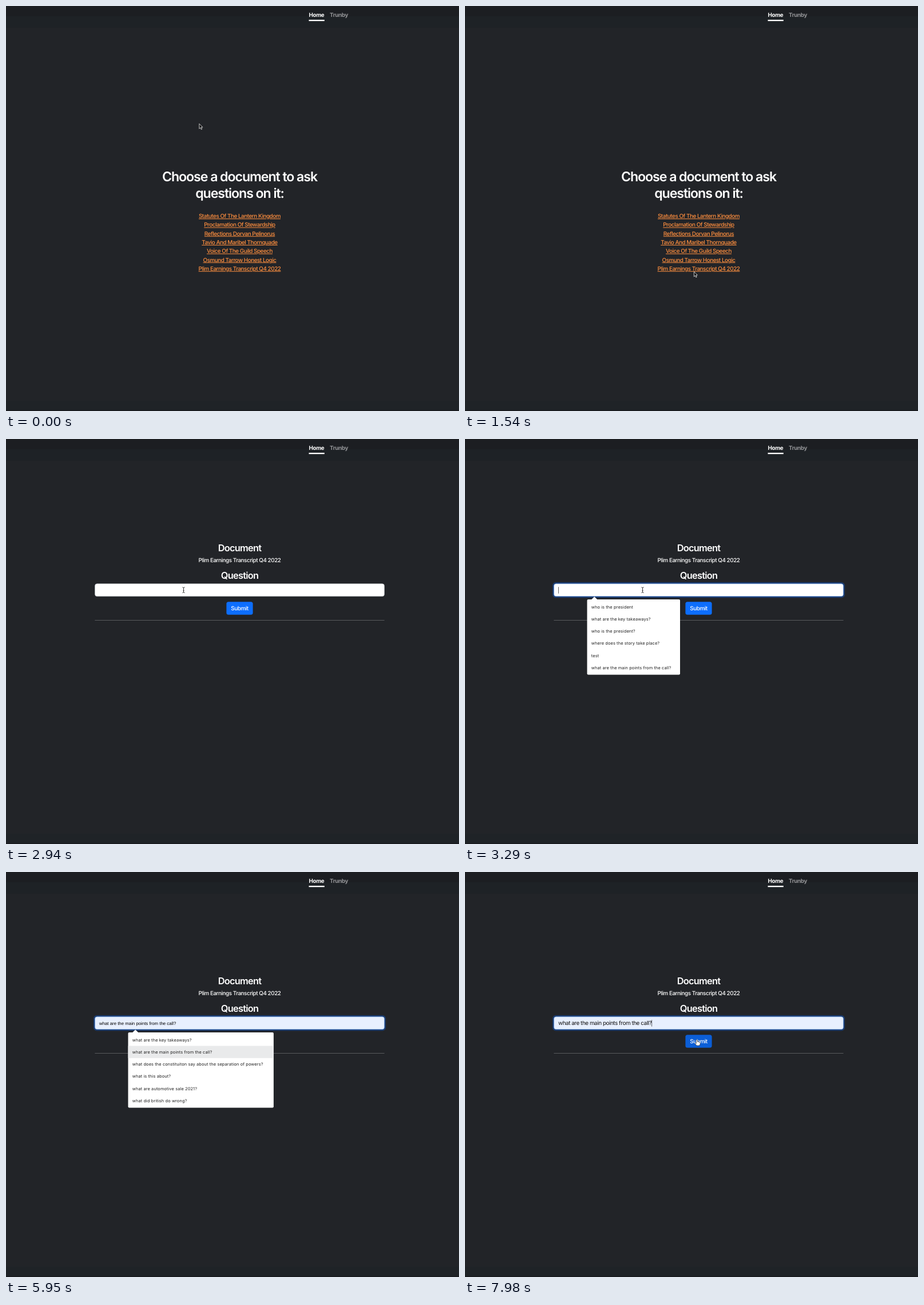
Recreate the animation shown at these times as an HTML page. Size 792 by 707 pixels, loop 8000 ms.

```html
<!DOCTYPE html>
<html lang="en">
<head>
<meta charset="utf-8">
<title>Ask a document</title>
<style>
  html, body { margin: 0; height: 100%; overflow: hidden; background: #222428; }
  svg { display: block; width: 792px; height: 707px; }
  text {
    font: 9.9px Inter, sans-serif;
    font-optical-sizing: none;
    letter-spacing: -.045em;
    text-rendering: geometricPrecision;
    fill: #fff;
    white-space: pre;
  }
  .mid text { text-anchor: middle; font-weight: 450; letter-spacing: -.047em; }
  .mid .h1 { font-size: 23.2px; font-weight: 600; }
  .mid .h2 { font-size: 16.4px; font-weight: 600; }
  .nav text { font-weight: 700; letter-spacing: -.04em; }
  #links text { fill: #ff8f3f; text-decoration: underline; }
  #field text { fill: #111; }
  #field .preview { font: 7.84px "Liberation Sans", Arial, sans-serif; letter-spacing: 0; fill: #000; }
  #menu text { font-size: 7.4px; letter-spacing: .016em; fill: #222; }
</style>
</head>
<body>
<svg viewBox="0 0 792 707">
  <rect width="792" height="707" fill="#222428"/>
  <rect width="792" height="38" fill="#1e2226"/>
  <rect width="792" height="18" fill="#1c1e22"/>
  <rect y="689" width="792" height="18" fill="#1f2327"/>
  <rect y="705" width="792" height="2" fill="#1a1c20"/>
  <g class="nav">
    <text x="529.5" y="18.5">Home</text>
    <text x="566" y="18.5" style="fill:#929396">Trunby</text>
    <rect x="529.5" y="24" width="27.3" height="2.3" fill="#fff"/>
  </g>

  <g id="home" class="mid">
    <text class="h1" x="408.5" y="306.2">Choose a document to ask</text>
    <text class="h1" x="408.5" y="334.7">questions on it:</text>
    <g id="links"></g>
  </g>

  <g id="form">
    <g class="mid">
      <text class="h2" x="408.5" y="196">Document</text>
      <text x="408.5" y="214.8">Plim Earnings Transcript Q4 2022</text>
      <text class="h2" x="408.5" y="243.8">Question</text>
      <rect id="button" x="385.4" y="284.2" width="46.2" height="22.6" rx="3.6"/>
      <text x="408.5" y="299.1">Submit</text>
    </g>
    <rect x="155.3" y="316" width="506.3" height=".8" fill="#66686b"/>
    <g id="field">
      <rect id="ring" x="152.9" y="250.1" width="511.2" height="27.2" rx="6" fill="#0d6efd"/>
      <rect id="box" x="155.6" y="252.8" width="505.8" height="21.8" rx="3.6" stroke-width=".7"/>
      <text id="entry" x="163" y="267.2"></text>
      <rect id="caret" y="258.3" width=".7" height="11.4" fill="#222"/>
    </g>
    <g id="menu">
      <path d="M220.8 280.5l5.4-5.3 5.4 5.3z" fill="#fff"/>
      <rect id="panel" x="213.5" y="280" height="131.5" rx="2" fill="#fff"/>
      <rect id="mark" x="213.5" width="254.4" height="21.3" fill="#e9eaeb"/>
    </g>
  </g>

  <g id="cursor">
    <path id="arrow" d="M.4 .5V9.3L2.3 7.4 3.8 10.5 5.2 9.9 3.8 6.7H6.4Z" fill="#111" stroke="#fff" stroke-width=".75"/>
    <path id="beam" d="M-2-4.7Q0-4.7 0-3.5Q0-4.7 2-4.7M0-3.5V3.5M-2 4.7Q0 4.7 0 3.5Q0 4.7 2 4.7M-1 .8H1" fill="none" stroke="#222" stroke-width=".9"/>
    <path id="hand" d="M-1 .2Q0-.8 1 .2V3.6Q2 0 2.6 3.8 3.8 3.2 4.2 4.4 5.6 4 5.6 5.4V7.4L4.4 10H-.6L-3 6.6Q-3.6 5.2-2.2 5.4L-1 6.4Z" fill="#fff" stroke="#222" stroke-width=".6"/>
  </g>
</svg>
<script>
const $ = id => document.getElementById(id);
const show = (id, on) => $(id).style.display = on ? '' : 'none';
const set = (id, name, value) => $(id).setAttribute(name, value);

function addText(parent, x, y, str = '') {
  const el = document.createElementNS('http://www.w3.org/2000/svg', 'text');
  el.setAttribute('x', x);
  el.setAttribute('y', y);
  el.textContent = str;
  return $(parent).appendChild(el);
}

const FIRST = 366.7, PITCH = 15.28, ROW = 21.2;
const links = [
  'Statutes Of The Lantern Kingdom',
  'Proclamation Of Stewardship',
  'Reflections Dorvan Pelinorus',
  'Tavio And Maribel Thornquade',
  'Voice Of The Guild Speech',
  'Osmund Tarrow Honest Logic',
  'Plim Earnings Transcript Q4 2022'
].map((str, i) => addText('links', 408.5, FIRST + i * PITCH + 3.4, str));

const takeaways = 'what are the key takeaways?';
const points = 'what are the main points from the call?';
const powers = 'what does the constituiton say about the separation of powers?';
const who = 'who is the president';
const story = 'where does the story take place?';
const menus = [
  [who, takeaways, who + '?', story, 'test', points],
  [who, takeaways, who + '?', story, points, powers],
  [takeaways, points, powers, 'what is this about?', 'what are automotive sale 2021?', 'what did british do wrong?']
];
const rows = menus[0].map((_, i) => addText('menu', 220.8, 295.7 + i * ROW));

// Pointer path: time, x, y
const path = [
  [0, 337.5, 205], [140, 331, 225], [210, 345, 280], [280, 372, 345], [350, 396, 398],
  [420, 403, 414], [490, 403, 414], [630, 413, 416.5], [770, 413, 416.5],
  [1190, 401, 466.5], [1260, 401, 466.5], [1540, 400, 463.2], [1750, 400, 463.2],
  [1820, 400, 462.3], [2240, 400, 462.3], [2380, 395, 451], [2940, 310.5, 263.6],
  [7280, 310.5, 263.6], [7420, 305, 266], [7980, 405.5, 293]
];

function pointer(t) {
  const i = Math.max(1, path.findIndex(p => p[0] >= t));
  const [t0, x0, y0] = path[i - 1], [t1, x1, y1] = path[i];
  const k = (t - t0) / (t1 - t0), e = k * k * (3 - 2 * k);
  return [x0 + (x1 - x0) * e, y0 + (y1 - y0) * e];
}

const typed = t => 'what'.slice(0, [4200, 4340, 4760, 4900].filter(s => t >= s).length);
const within = (t, ...spans) => spans.some(([a, b]) => t >= a && t < b);

function draw(t) {
  const home = t < 2310;
  const [x, y] = pointer(t);
  show('home', home);
  show('form', !home);

  const hot = links.findIndex((_, i) => {
    const d = y - FIRST - i * PITCH;
    return d > -6 && d < 4.5;
  });
  links.forEach((el, i) => el.style.textDecoration = i === hot ? 'none' : '');

  const onButton = !home && x > 385 && x < 432 && y > 284 && y < 307;
  const onField = !home && y > 252 && y < 275;
  set('button', 'fill', onButton ? '#0b5ed7' : '#0d6efd');

  const preview = within(t, [5390, 6510]);
  const focus = Math.min(1, Math.max(0, (t - 3080) / 140));
  set('ring', 'opacity', focus * .32);
  set('box', 'fill', t >= 5390 ? '#e8f0fe' : '#fff');
  set('box', 'stroke', focus ? '#86b7fe' : '#ced4da');
  set('entry', 'class', preview ? 'preview' : '');
  $('entry').textContent = t < 5390 ? typed(t) : t < 5950 ? takeaways : points;
  show('caret', within(t, [3150, 3710], [4200, 5390], [6510, 7070], [7630, 8000]));
  set('caret', 'x', 163.2 + ($('entry').textContent && !home ? $('entry').getComputedTextLength() : 0));

  const stage = t < 4270 ? 0 : t < 4760 ? 1 : 2;
  show('menu', within(t, [3220, 6510]));
  set('panel', 'width', stage ? 254.4 : 162.5);
  rows.forEach((el, i) => el.textContent = menus[stage][i]);
  show('mark', preview);
  set('mark', 'y', t < 5950 ? 282.3 : 282.3 + ROW);

  const hand = home ? hot >= 0 : onButton;
  show('cursor', t < 3500 || t >= 7350);
  set('cursor', 'transform', `translate(${x} ${y})`);
  show('hand', hand);
  show('beam', onField && !hand);
  show('arrow', !onField && !hand);
}

// The screen refreshes every 70 ms
function tick() {
  draw(Math.floor(performance.now() % 8000 / 70) * 70);
  requestAnimationFrame(tick);
}
tick();
</script>
</body>
</html>
```
